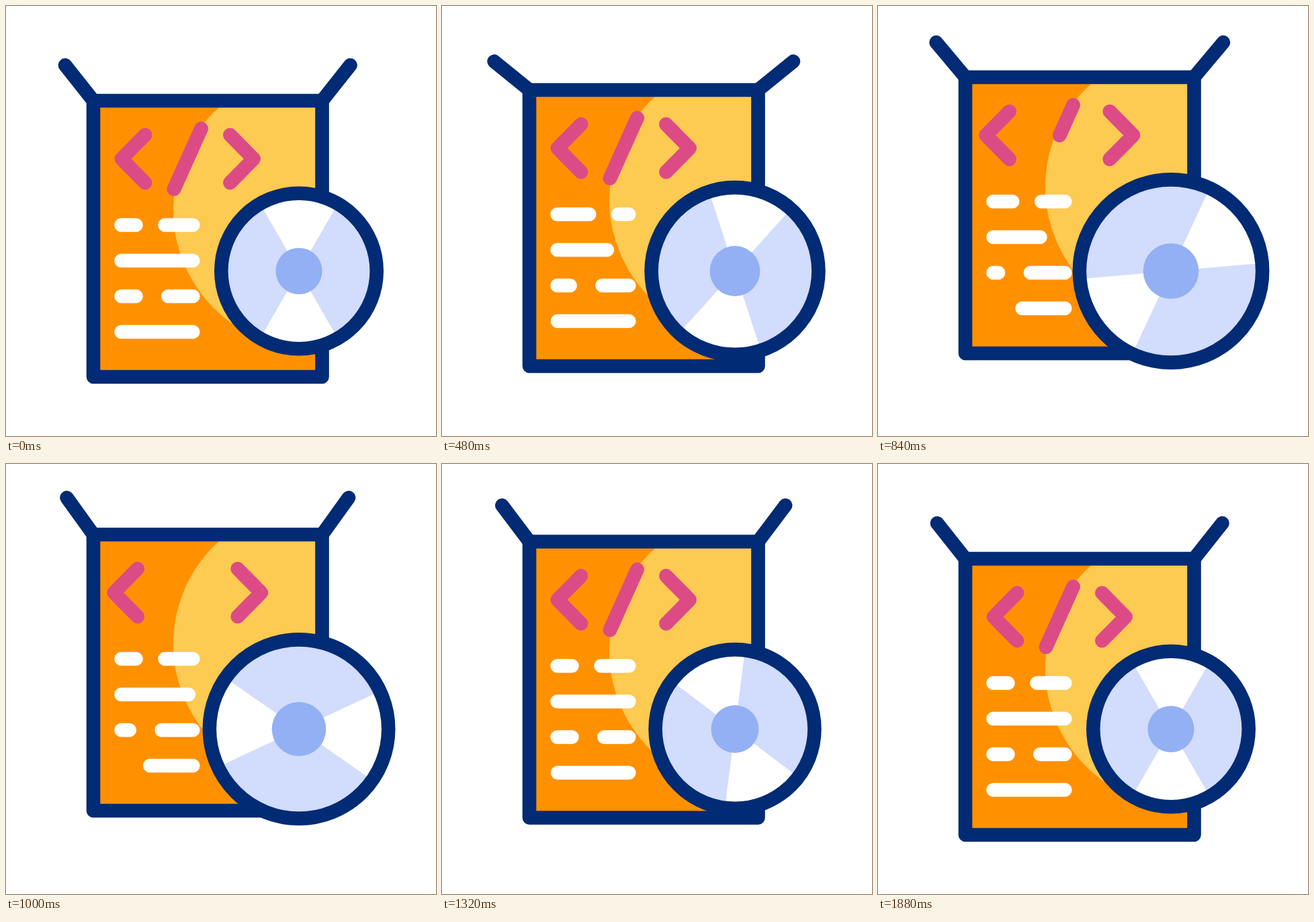
An HTML page for the animation above (2000 ms loop, 640 by 640 pixels).

```html
<!DOCTYPE html>
<html lang="en">
<head>
<meta charset="utf-8">
<title>Software package</title>
<style>
html, body { margin: 0; width: 100%; height: 100%; overflow: hidden; background: #fff; }
svg { display: block; width: 100vw; height: 100vh; }
path, rect, circle { stroke-linecap: round; stroke-linejoin: round; }
.navy { stroke: #022b75; stroke-width: 20.6; fill: none; }
.pink { stroke: #dd4b86; stroke-width: 21; fill: none; }
.code { stroke: #fff; stroke-width: 20.6; fill: none; }
</style>
</head>
<body>
<svg viewBox="0 0 640 640">
  <clipPath id="page"><rect x="130" y="141" width="340.5" height="411"/></clipPath>
  <g id="body">
    <rect x="130" y="141" width="340.5" height="411" fill="#ff9100"/>
    <circle cx="455" cy="304" r="206" fill="#fdca52" clip-path="url(#page)"/>
    <rect class="navy" x="130" y="141" width="340.5" height="411"/>
    <path class="navy" id="flaps"/>
    <path class="pink" id="brackets"/>
    <path class="pink" id="slash"/>
    <path class="code" id="code"/>
  </g>
  <g transform="translate(436 394.5)">
    <circle id="disc" fill="#d2dcfd"/>
    <path id="wedges" fill="#fff"/>
    <circle id="hub" fill="#93b0f4"/>
    <circle id="rim" class="navy"/>
  </g>
</svg>
<script>
const LOOP = 2000, STEP = 40;
const $ = id => document.getElementById(id);
const set = (id, name, value) => $(id).setAttribute(name, value);

// Cubic bezier easing with handles (a, 0) and (b, 1)
function ease(x, a, b) {
  let lo = 0, hi = 1;
  for (let i = 0; i < 24; i++) {
    const u = (lo + hi) / 2, v = 1 - u;
    if (3 * a * v * v * u + 3 * b * v * u * u + u ** 3 < x) lo = u; else hi = u;
  }
  return lo * lo * (3 - 2 * lo);
}

// Keys are [time, value, a, b]; a and b shape the way into that key
function track(t, ...keys) {
  if (t <= keys[0][0]) return keys[0][1];
  for (let i = 1; i < keys.length; i++) {
    const [t0, v0] = keys[i - 1], [t1, v1, a = .5, b = .5] = keys[i];
    if (t < t1) return v0 + (v1 - v0) * ease((t - t0) / (t1 - t0), a, b);
  }
  return keys[keys.length - 1][1];
}

// Leaves zero, peaks, and returns to zero
const bump = (t, start, top, end, size) => track(t, [start, 0], [top, size], [end, 0]);

function draw(t) {
  const lift = track(t, [0, 0], [1000, 36, .637, .365], [1880, 0, .54, .32]);
  set('body', 'transform', `translate(0 ${-lift})`);

  const flap = track(t, [0, 38.4], [520, 51], [1040, 35.6], [1600, 38.4]) * Math.PI / 180;
  const dx = 67.6 * Math.sin(flap), y = 141 - 67.6 * Math.cos(flap);
  set('flaps', 'd', `M130 141L${130 - dx} ${y}M470.5 141L${470.5 + dx} ${y}`);

  const gap = bump(t, 480, 920, 1340, 12);
  set('brackets', 'd', `M${207 - gap} 192l-35 35.5l35 35.5M${333.5 + gap} 192l35 35.5l-35 35.5`);

  const len = track(t, [720, 1], [960, 0], [1000, 0], [1300, 1]);
  set('slash', 'd', len > .001 ? `M290.5 182.5l${-40.5 * len} ${90 * len}` : '');

  const d1 = bump(t, 80, 560, 1000, 27);
  const d2 = bump(t, 200, 680, 1120, 49);
  const d3 = bump(t, 320, 810, 1270, 14.5);
  const d4 = bump(t, 440, 920, 1360, 45);
  set('code', 'd', `M171.5 326H${193.5 + d1}M${236.5 + d1} 326H278.3
    M171.5 379H${278.3 - d2}
    M171.5 432H${193.5 - d3}M${241.3 - d3} 432H278.3
    M${171.5 + d4} 485H278.3`);

  const r = track(t, [120, 115.7], [820, 136.2, .53, .62], [1520, 115.7, .42, .5]);
  const inner = r - 10.2, x = r / 2, h = r * Math.sqrt(3) / 2;
  set('disc', 'r', r);
  set('rim', 'r', r);
  set('hub', 'r', inner * .328);
  set('wedges', 'd', `M0 0L${-x} ${-h}A${r} ${r} 0 0 1 ${x} ${-h}ZM0 0L${x} ${h}A${r} ${r} 0 0 1 ${-x} ${h}Z`);
  set('wedges', 'transform', `rotate(${track(t, [0, 0], [1880, 180, .68, .38])})`);
}

const begin = performance.now();
function tick() {
  const t = (performance.now() - begin) % LOOP;
  draw(Math.floor(t / STEP) * STEP);
  requestAnimationFrame(tick);
}
tick();
</script>
</body>
</html>
```
